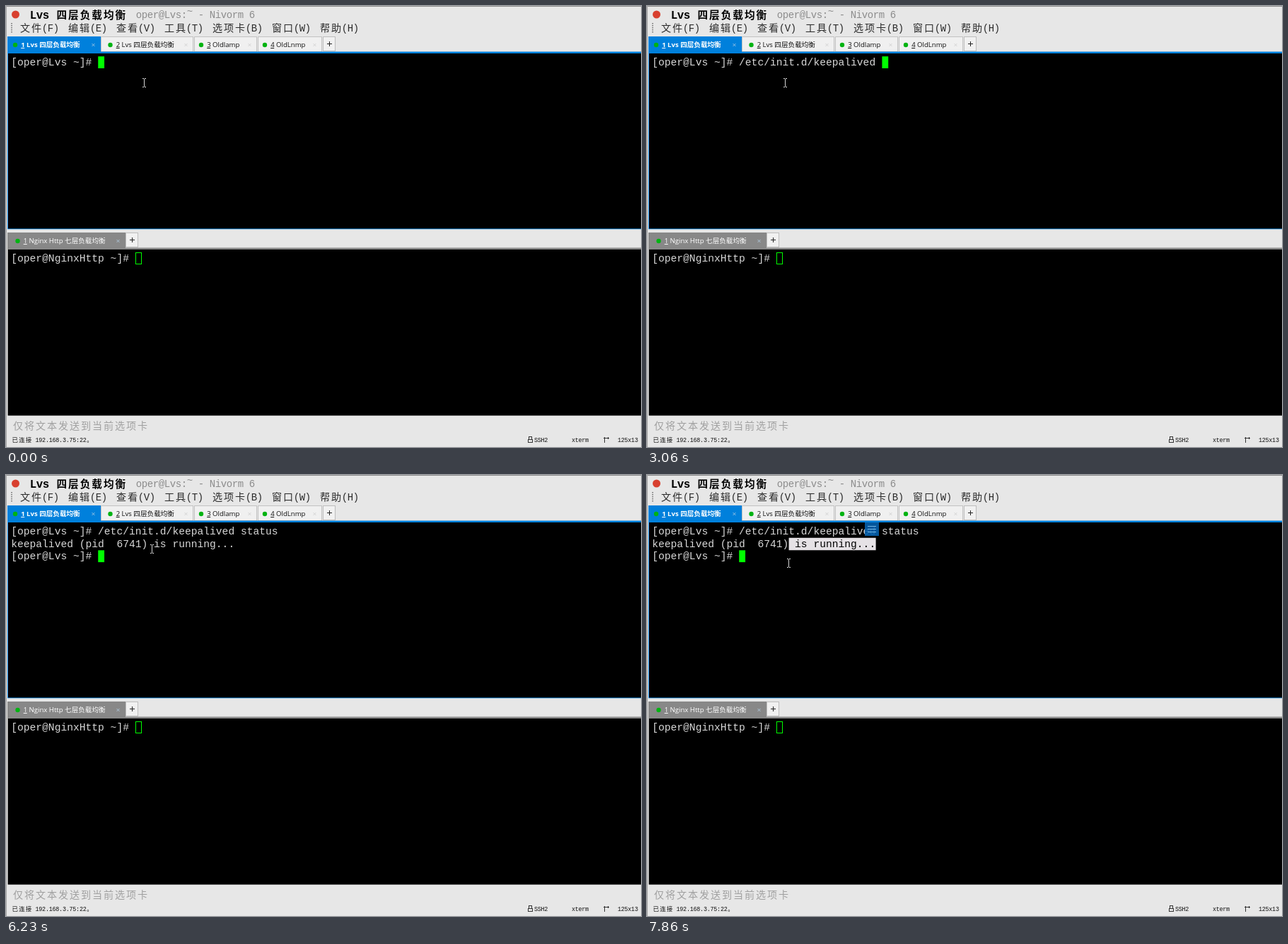
Write an HTML page with a canvas that moves like this. It is 898 px wide and 623 px high and loops after 7990 ms.

```html
<!DOCTYPE html>
<html lang="zh">
<head>
<meta charset="utf-8">
<title>Terminal session</title>
<style>
html, body { margin: 0; width: 100%; height: 100%; overflow: hidden; background: #e7e7e7; }
canvas { display: block; width: 100%; height: 100%; }
</style>
</head>
<body>
<canvas id="stage" width="898" height="623"></canvas>
<script>
const ctx = document.getElementById('stage').getContext('2d');
const LOOP = 7990;
const PANEL = '#e7e7e7', BLUE = '#0080dc', GREY = '#888888', GREEN = '#00ff00', DOT = '#00b312';
const INK = '#d8d8d8', SELECTED = '#e6e2e6';
const MONO = '"Liberation Mono", monospace';
const CJK = '"Noto Sans CJK SC", "Noto Sans CJK", sans-serif';
const UI = '"Open Sans", "Noto Sans CJK SC", "Noto Sans CJK", sans-serif';

// Terminal grid
const LEFT = 7.2, TOP = 71.2, CELL = 8.79, LINE = 17.57;
const PROMPT = '[oper@Lvs ~]# ';
const REPLY = 'keepalived (pid  6741) is running...';
const SEL_START = REPLY.indexOf(' is');

// Typing bursts: start, end, text
const BURSTS = [
  [1060, 2130, '/etc/init.d/'], [2780, 2910, 'ke'], [3060, 3060, 'epalived '],
  [3770, 3770, 's'], [4080, 4080, 'ta'], [4230, 4500, 'tus']
];
const KEY_TICK = 134;
const ENTER = 4930;

// Pointer stops: tick, x, y
const MOVE = 5925, TICK = 137;
const DRAG_FROM = 3, DRAG_TO = 8;
const PATH = [
  [-1, 195, 108], [0, 200, 106], [2, 206, 104], [DRAG_FROM, 343, 108], [5, 357, 104],
  [DRAG_TO, 326, 100], [10, 230, 97], [13, 266, 97], [14, 200, 124]
];

const colX = col => LEFT + col * CELL;
const rowY = row => TOP + row * LINE;
const tickAt = t => Math.max(-1, Math.floor((t - MOVE) / TICK));

function pointerAt(k) {
  const i = Math.max(1, PATH.findIndex(p => p[0] >= k));
  const [k0, x0, y0] = PATH[i - 1], [k1, x1, y1] = PATH[i];
  const f = (k - k0) / (k1 - k0);
  return { x: x0 + (x1 - x0) * f, y: y0 + (y1 - y0) * f };
}

function typedAt(t) {
  let out = '';
  for (const [start, end, word] of BURSTS) {
    if (t < start) break;
    const ticks = Math.round((end - start) / KEY_TICK);
    const k = Math.floor((t - start + 25) / KEY_TICK);
    const count = k < ticks ? Math.floor(1.15 + k * (word.length - 1) / ticks) : word.length;
    out += word.slice(0, count);
  }
  return out;
}

function box(x, y, w, h, color) {
  ctx.fillStyle = color;
  ctx.fillRect(x, y, w, h);
}

function frame(x, y, w, h, color) {
  ctx.strokeStyle = color;
  ctx.lineWidth = 1;
  ctx.strokeRect(x + 0.5, y + 0.5, w - 1, h - 1);
}

function dot(x, y, r, color) {
  ctx.fillStyle = color;
  ctx.beginPath();
  ctx.arc(x, y, r, 0, 7);
  ctx.fill();
}

function text(str, x, y, font, color) {
  ctx.font = font;
  ctx.fillStyle = color;
  ctx.fillText(str, x, y);
}

// Fixed grid: Latin takes one half cell, Chinese takes two.
function cells(str, x, y, half, color, weight = '') {
  ctx.textAlign = 'center';
  for (const ch of str) {
    const wide = ch > '\u2fff';
    const w = wide ? half * 2 : half;
    const font = wide ? `${half * 1.76}px ${CJK}` : `${half * 1.75}px ${MONO}`;
    text(ch, x + w / 2, y, `${weight} ${font}`, color);
    x += w;
  }
  ctx.textAlign = 'left';
}

function term(str, row, color = INK, top = TOP) {
  text(str, LEFT, top + row * LINE + 12.8, `${CELL / 0.6001}px ${MONO}`, color);
}

function closeMark(x, y, color) {
  ctx.strokeStyle = color;
  ctx.lineWidth = 0.8;
  ctx.beginPath();
  for (const s of [-2, 2]) {
    ctx.moveTo(x - 2, y - s);
    ctx.lineTo(x + 2, y + s);
  }
  ctx.stroke();
}

function tab(x, y, w, lead, num, name, fill, ink, weight = '') {
  const base = y + 15, numX = x + lead + 8.2;
  const plain = ink === '#111';
  box(x, y, w, 22, fill);
  if (plain) frame(x, y, w, 22, '#c2c2c2');
  dot(x + lead, y + 12, 3.2, DOT);
  text(num, numX, base, `${weight} 9.6px ${UI}`, ink);
  box(numX, base + 1, 5, 1, ink);
  text(name, numX + 7.8, base, `${weight} 9.6px ${UI}`, ink);
  closeMark(x + w - 10.5, y + 12, plain ? '#cccccc' : '#b4cfe4');
}

function plusTab(x, y) {
  box(x, y, 18, 21, '#f1f1f1');
  frame(x, y, 18, 21, '#bdbdbd');
  box(x + 6, y + 10, 7, 1, '#222');
  box(x + 9, y + 7, 1, 7, '#222');
}

function header() {
  dot(13.5, 12, 5.5, '#d8402f');
  cells('Lvs ', 34, 17.6, 9, '#000', 'bold');
  cells('四层负载均衡', 70.5, 17.6, 8.3, '#000', 'bold');
  cells('oper@Lvs:', 184, 17, 8, '#8c8c8c');
  cells('~', 256, 12, 8, '#8c8c8c');
  cells(' - Nivorm 6', 264, 17, 8, '#8c8c8c');
  for (let y = 24; y < 39; y += 3) box(7, y, 2, 1.5, '#888');
  let x = 19;
  for (const name of ['文件(F)', '编辑(E)', '查看(V)', '工具(T)', '选项卡(B)', '窗口(W)', '帮助(H)']) {
    cells(name, x, 36.3, 8, '#2c2c2c');
    x += name.length * 16 - 12 + (name.length > 5 ? 0 : 0);
  }
}

function upperPane() {
  tab(2, 43, 132, 11, '1', 'Lvs 四层负载均衡', BLUE, '#fff', 'bold');
  tab(134, 43, 131, 13.5, '2', 'Lvs 四层负载均衡', '#f0f0f0', '#111');
  tab(266, 43, 89, 10, '3', 'Oldlamp', '#f0f0f0', '#111');
  tab(356, 43, 91, 10, '4', 'OldLnmp', '#f0f0f0', '#111');
  plusTab(448, 43);
  box(2, 64.5, 896, 250.8, BLUE);
  box(3, 67, 895, 247.5, '#000');
}

function lowerPane() {
  tab(2, 320, 167, 14.5, '1', 'Nginx Http 七层负载均衡', GREY, '#fff');
  plusTab(169, 320);
  box(2, 341.5, 896, 237, GREY);
  box(3, 344, 895, 234.5, '#000');
  term('[oper@NginxHttp ~]# ', 0, INK, 348.2);
  frame(183, 348, 9, 17, GREEN);
}

function statusBar() {
  cells('仅将文本发送到当前选项卡', 9, 597.5, 8, '#a0a0a0');
  const note = (str, x) => cells(str, x, 616.3, 4.8, '#111');
  note('已连接 192.168.3.75:22。', 8);
  note('SSH2', 747);
  note('xterm', 800);
  note('125x13', 865);
  frame(738, 612, 7, 5, '#333');
  frame(739, 608, 5, 5, '#333');
  box(846, 609, 1, 8, '#333');
  box(845, 610, 8, 1, '#333');
  box(851, 609, 1, 3, '#333');
}

function session(t, color) {
  term(PROMPT + typedAt(t), 0, color);
  if (t < ENTER) return;
  term(REPLY, 1, color);
  term(PROMPT, 2, color);
}

// The selection trails slightly behind the dragging pointer.
function selection(t) {
  const k = tickAt(t);
  if (k < DRAG_FROM) return;
  const { x, y } = pointerAt(Math.min(k, DRAG_TO) - 0.14);
  const end = colX(Math.round((x - LEFT) / CELL));
  const start = colX(SEL_START);
  const wraps = y + 1 > rowY(2);
  ctx.save();
  ctx.beginPath();
  ctx.rect(start, rowY(1), (wraps ? 898 : end) - start, LINE);
  if (wraps) ctx.rect(LEFT, rowY(2), end - LEFT, LINE);
  ctx.fillStyle = SELECTED;
  ctx.fill();
  ctx.clip();
  session(t, '#000');
  ctx.restore();
}

function caret(t) {
  const done = t >= ENTER;
  const col = PROMPT.length + (done ? 0 : typedAt(t).length);
  box(colX(col), rowY(done ? 2 : 0), CELL, 16.8, GREEN);
}

function popup() {
  box(308, 67, 20, 19, 'rgba(5, 96, 172, 0.9)');
  for (let y = 72; y <= 80; y += 4) box(312, y, 12, 1, '#70b4e4');
}

function pointer(t) {
  const p = pointerAt(tickAt(t));
  const x = Math.round(p.x), y = Math.round(p.y);
  ctx.globalCompositeOperation = 'difference';
  box(x, y - 5, 1, 11, INK);
  for (const end of [y - 6, y + 6]) {
    box(x - 2, end, 2, 1, INK);
    box(x + 1, end, 2, 1, INK);
  }
  ctx.globalCompositeOperation = 'source-over';
}

function draw(t) {
  box(0, 0, 898, 623, PANEL);
  box(0, 0, 898, 1, '#8a8a8a');
  box(0, 0, 1, 623, '#a8a8a8');
  header();
  upperPane();
  lowerPane();
  statusBar();
  session(t, INK);
  selection(t);
  caret(t);
  if (tickAt(t) > DRAG_TO) popup();
  pointer(t);
}

const begin = performance.now();
function tick() {
  draw((performance.now() - begin) % LOOP);
  requestAnimationFrame(tick);
}
tick();
</script>
</body>
</html>
```
